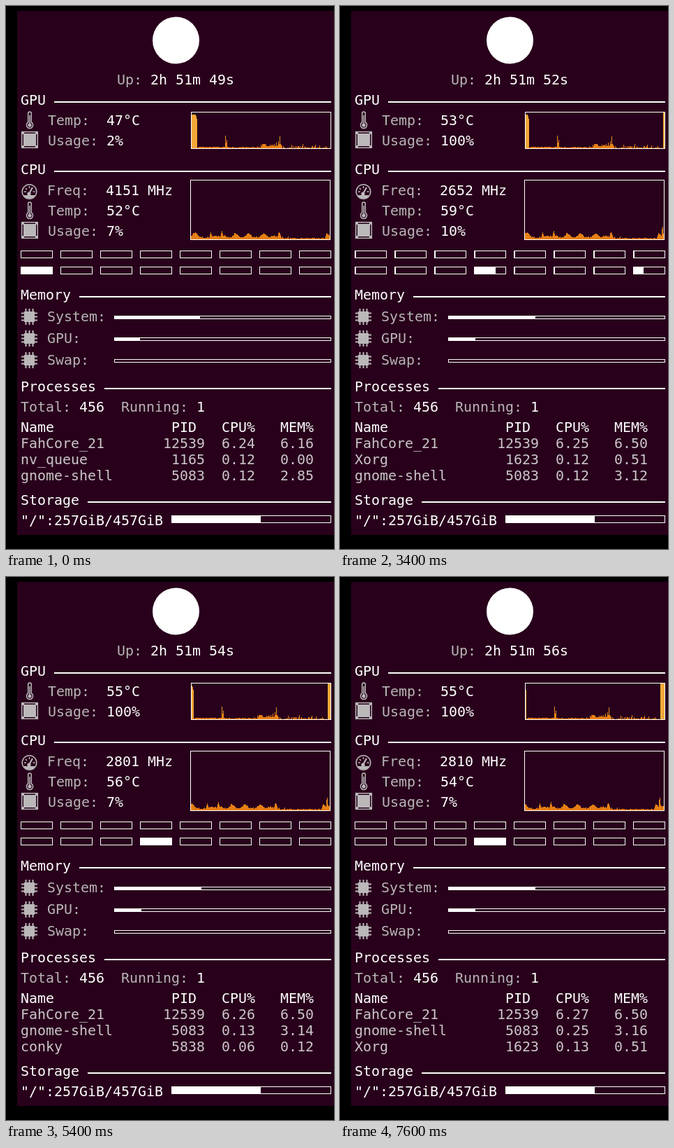
Recreate the animation shown at these times as an HTML page. Size 470 px wide and 775 px high, loop 8000 ms.

```html
<!DOCTYPE html>
<html lang="en">
<head>
<meta charset="utf-8">
<title>System monitor</title>
<style>
  html, body { margin: 0; width: 100%; height: 100%; overflow: hidden; background: #000; }
  svg { display: block; }
  text { font: 19.93px "DejaVu Sans Mono", monospace; fill: #fff; white-space: pre; }
  .label { fill: #b8b4b6; }
  .row { fill: #cbc5c9; }
  .end { text-anchor: end; }
  .box { fill: none; stroke: #fff; }
  .icon { fill: #bbb8ba; stroke: none; }
  .line { fill: none; stroke: #bbb8ba; stroke-width: 1.5; }
</style>
</head>
<body>
<svg id="stage" width="470" height="775" viewBox="0 0 470 775">
  <rect width="470" height="775"/>
  <rect x="16" y="7" width="454" height="748" fill="#28001b"/>
  <circle cx="243.5" cy="49" r="33.5" fill="#fff"/>
</svg>
<script>
const NS = 'http://www.w3.org/2000/svg';
const stage = document.getElementById('stage');

function add(tag, attrs, parent = stage) {
  const el = document.createElementNS(NS, tag);
  for (const k in attrs) el.setAttribute(k, attrs[k]);
  return parent.appendChild(el);
}
function text(x, y, str, cls = '') {
  const el = add('text', { x, y, class: cls });
  el.textContent = str;
  return el;
}
const value = (x, y) => text(x, y, '');
const rect = (x, y, width, height, cls, parent) =>
  add('rect', { x, y, width, height, class: cls }, parent);

// Outlined bar; the returned element is its white fill.
function bar(x, y, w, h) {
  add('rect', { x: x + .5, y: y + .5, width: w - 1, height: h - 1, class: 'box' });
  return add('rect', { x, y, width: 0, height: h, fill: '#fff' });
}
function heading(y, str) {
  text(21, y, str);
  const x = 33 + str.length * 12;
  add('rect', { x, y: y - 5, width: 466 - x, height: 2, fill: '#fff' });
}

// Icons
const at = (x, y) => add('g', { transform: `translate(${x} ${y})` });
function thermometer(y) {
  const g = at(28, y);
  add('path', { d: 'M3.7 16V3.2a2.3 2.3 0 0 1 4.6 0V16a4.6 4.6 0 1 1-4.6 0z', class: 'line' }, g);
  add('path', { d: 'M6 6V19', class: 'line' }, g);
  add('circle', { cx: 6, cy: 20, r: 2.6, class: 'icon' }, g);
}
function processor(y) {
  const g = at(22, y);
  add('rect', { x: .7, y: .7, width: 22.6, height: 22.6, class: 'line' }, g);
  rect(3, 3, 18, 18, 'icon', g);
  for (const [x, y] of [[1, 1], [20, 1], [1, 20], [20, 20]]) rect(x, y, 3, 3, 'icon', g);
}
function gauge(y) {
  const g = at(22, y);
  add('circle', { cx: 11.5, cy: 11, r: 10.3, class: 'line', 'stroke-width': 2 }, g);
  add('path', { d: 'M3 16H20A10 10 0 0 1 3 16z', class: 'icon' }, g);
  add('path', { d: 'M11 14L16 5', class: 'line', style: 'stroke-width:2.2' }, g);
  add('circle', { cx: 11, cy: 14, r: 2.6, class: 'icon' }, g);
  add('path', { d: 'M4 11h3M6 6l2 2M11.5 3v3M16.5 11h3', class: 'line' }, g);
}
function chip(y) {
  const g = at(22, y);
  rect(4, 4, 15, 15, 'icon', g);
  for (const p of [5.5, 10.5, 15.5]) {
    rect(p, 0, 2, 23, 'icon', g);
    rect(0, p, 23, 2, 'icon', g);
  }
}

// Charts: one column per pixel, scrolled left by a pixel each tick
let seed = 7;
const rnd = () => (seed = seed * 16807 % 2147483647) / 2147483647;
const COLS = 199;

function chart(x, y, height, heights) {
  add('rect', { x: x + .5, y: y + .5, width: COLS + 1, height: height + 1, class: 'box' });
  const view = add('svg', { x: x + 1, y: y + 1, width: COLS, height, overflow: 'hidden' });
  const g = add('g', {}, view);
  heights.forEach((h, i) => {
    if (h < .5) return;
    const k = Math.min(1, h / height);
    const fill = `rgb(${228 + 16 * k},${122 + 48 * k},${14 + 44 * k})`;
    add('rect', { x: i, y: height - Math.round(h), width: 1, height: Math.round(h), fill }, g);
  });
  return g;
}

const gpuPeaks = { 6: 46, 7: 42, 48: 18, 49: 8, 50: 12, 121: 8, 124: 10, 126: 17, 128: 5,
  143: 5, 155: 3, 159: 6, 177: 5, 183: 4, 192: 3 };
function gpuHeight(i) {
  if (i < 6) return 48;
  if (i >= COLS) return i > COLS ? 51 : 0;
  const n = rnd();
  if (gpuPeaks[i]) return gpuPeaks[i];
  if (i < 56) return 1 + 1.6 * n;
  if (i < 99) return 1 + n * n * 1.6;
  if (i < 128) return 2.5 + 3.5 * n;
  return n > .88 ? 3 : n > .3 ? 1 : 0;
}

const cpuBumps = [[5, 7, 3], [28, 7, 1], [36, 2, 3], [44, 10, .9], [48, 4, 1], [63, 5, 3],
  [82, 5, 3], [104, 5, 3], [119, 2, 3], [126, 8, 1.3], [139, 2, .6], [194, 7, 1.2], [197, 5, 1.5]];
const cpuLoad = [18, 21, 10, 7, 7, 7, 7];
function cpuHeight(i) {
  if (i >= COLS) return cpuLoad[i - COLS] * .84;
  const base = i < 132 ? 2 + 2 * rnd() : .8 + 1.2 * rnd();
  return cpuBumps.reduce((h, [c, a, w]) => h + a * Math.exp(-(((i - c) / w) ** 2) / 2), base);
}
const series = f => Array.from({ length: COLS + 7 }, (_, i) => f(i));

// Layout
text(159, 112, 'Up:', 'label');
const up = value(207, 112);

heading(141, 'GPU');
thermometer(150);
processor(179);
text(60, 170, 'Temp:', 'label');
text(60, 199, 'Usage:', 'label');
const gpuTemp = value(144, 170), gpuUse = value(144, 199);
const gpuChart = chart(265, 151, 51, series(gpuHeight));

heading(240, 'CPU');
gauge(254);
thermometer(279);
processor(308);
text(59, 270, 'Freq:', 'label');
text(60, 299, 'Temp:', 'label');
text(60, 328, 'Usage:', 'label');
const freq = value(143, 270), cpuTemp = value(144, 299), cpuUse = value(144, 328);
const cpuChart = chart(264, 248, 84, series(cpuHeight));

const cores = [];
for (const y of [349, 372])
  for (let i = 0; i < 8; i++) cores.push(bar(21 + 57 * i, y, 46, 11));

heading(419, 'Memory');
const [sysMem, gpuMem] = ['System:', 'GPU:', 'Swap:'].map((name, i) => {
  chip(432 + 31 * i);
  text(59, 450 + 31 * i, name, 'label');
  return bar(155, 442 + 31 * i, 311, 5);
});

heading(550, 'Processes');
text(21, 579, 'Total:', 'label');
text(105, 579, '456');
text(165, 579, 'Running:', 'label');
const running = value(273, 579);
text(21, 608, 'Name');
text(237, 608, 'PID');
text(309, 608, 'CPU%');
text(393, 608, 'MEM%');
const rows = [631, 654, 677].map(y => [
  text(21, y, '', 'row'),
  ...[285, 357, 441].map(x => text(x, y, '', 'row end'))
]);

heading(712, 'Storage');
text(21, 741, '"/":257GiB/457GiB');
bar(237, 727, 229, 11).setAttribute('width', 128);

// start, GPU temp, GPU use, MHz, CPU temp, CPU use, running, processes
const steps = [
  [0, 47, 2, 4151, 52, 7, 1, 'FahCore_21 12539 6.24 6.16|nv_queue 1165 0.12 0.00|gnome-shell 5083 0.12 2.85'],
  [1400, 47, 0, 3927, 62, 18, 1, 'FahCore_21 12539 28.40 6.50|gnome-shell 5083 0.19 3.11|conky 5838 0.13 0.12'],
  [2400, 49, 100, 3819, 61, 21, 2, 'FahCore_21 12539 14.27 6.50|gnome-shell 5083 0.06 3.12|conky 5838 0.06 0.12'],
  [3400, 53, 100, 2652, 59, 10, 1, 'FahCore_21 12539 6.25 6.50|Xorg 1623 0.12 0.51|gnome-shell 5083 0.12 3.12'],
  [4400, 54, 100, 2652, 58, 7, 2, 'FahCore_21 12539 6.26 6.50|gnome-shell 5083 0.13 3.13|FAHControl 6366 0.06 0.41'],
  [5400, 55, 100, 2801, 56, 7, 1, 'FahCore_21 12539 6.26 6.50|gnome-shell 5083 0.13 3.14|conky 5838 0.06 0.12'],
  [6200, 55, 100, 2920, 55, 7, 2, 'FahCore_21 12539 6.27 6.50|rambox 6379 0.13 0.98|Xorg 1623 0.06 0.51'],
  [7000, 55, 100, 2810, 54, 7, 1, 'FahCore_21 12539 6.27 6.50|gnome-shell 5083 0.25 3.16|Xorg 1623 0.13 0.51']
];

// Fill width of a core's bar in pixels
const busy = [{ 8: 46 }, { 8: 29, 15: 20 }, { 8: 9, 11: 14, 14: 5, 15: 35 }, { 11: 31, 15: 15 }, { 11: 46 }];
const idle = [1, 5, 7, 2];
function coreWidth(tick, i) {
  return busy[Math.min(tick, 4)][i] || idle[tick] || 1;
}

function show(tick) {
  const [, gt, gu, mhz, ct, cu, run, procs] = steps[tick];
  up.textContent = `2h 51m ${49 + tick}s`;
  gpuTemp.textContent = gt + '°C';
  gpuUse.textContent = gu + '%';
  freq.textContent = mhz + ' MHz';
  cpuTemp.textContent = ct + '°C';
  cpuUse.textContent = cu + '%';
  running.textContent = run;
  procs.split('|').forEach((p, r) =>
    p.split(' ').forEach((s, c) => rows[r][c].textContent = s));
  cores.forEach((c, i) => c.setAttribute('width', coreWidth(tick, i)));
  sysMem.setAttribute('width', tick ? 125 : 123);
  gpuMem.setAttribute('width', tick ? 39 : 37);
  for (const c of [gpuChart, cpuChart]) c.setAttribute('transform', `translate(${-tick} 0)`);
}

let shown = -1;
const start = performance.now();
function frame() {
  const t = (performance.now() - start) % 8000;
  const tick = steps.filter(s => s[0] <= t).length - 1;
  if (tick !== shown) show(shown = tick);
  requestAnimationFrame(frame);
}
frame();
</script>
</body>
</html>
```
